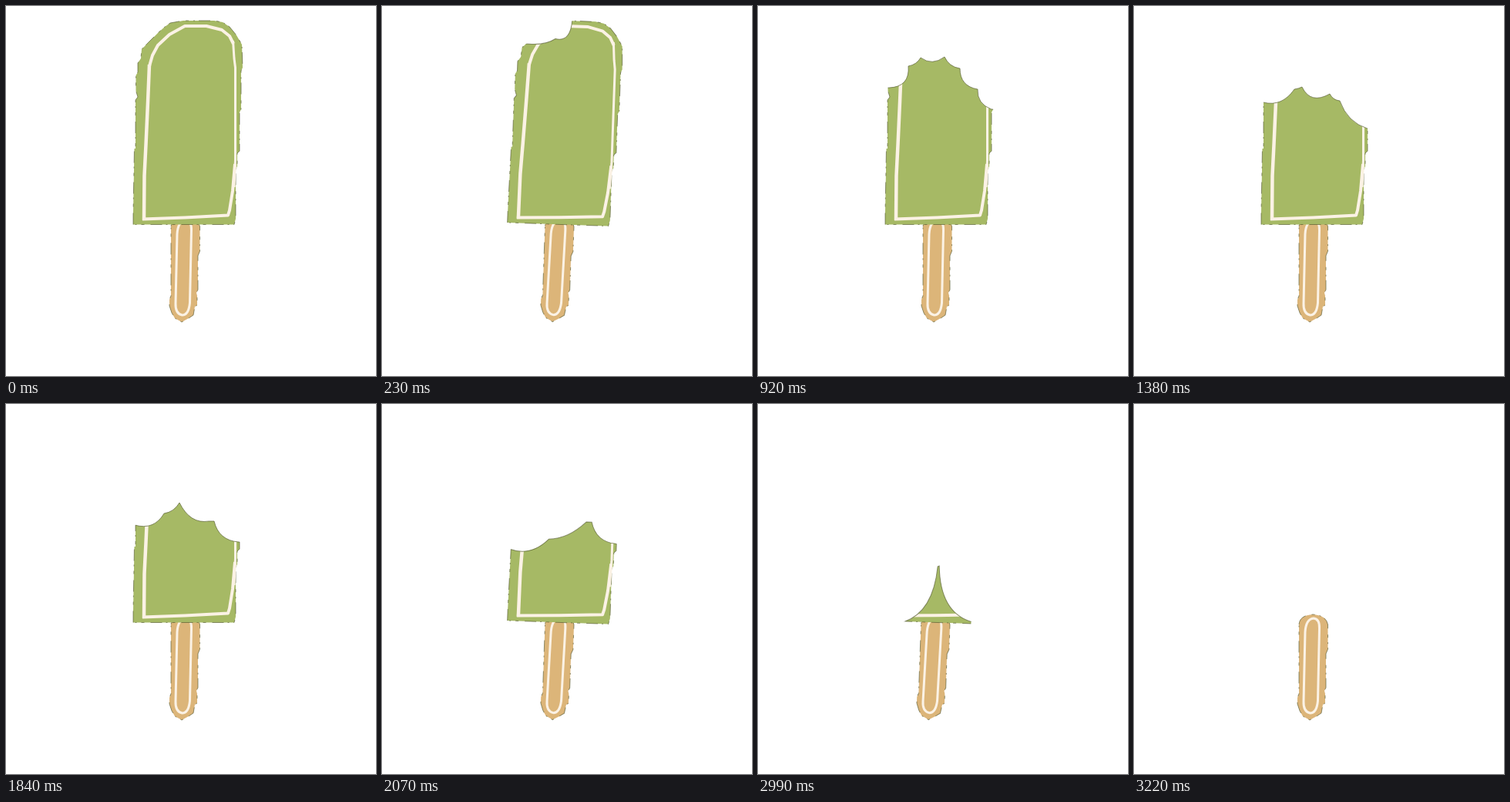
An HTML page for the animation above (3.45 s loop, 480 by 480 pixels).

```html
<!DOCTYPE html>
<html lang="en">
<head>
<meta charset="utf-8">
<title>Ice pop</title>
<style>
  html, body { margin: 0; width: 100%; height: 100%; overflow: hidden; background: #fff; }
  svg { display: block; width: 100%; height: 100%; }
  .line { fill: none; stroke: #fbf2e5; stroke-linejoin: round; }
  .edge { fill: none; stroke: #4b5128; stroke-opacity: .6; }
  .rough { stroke-dasharray: 15 8 4 6 2 5; }
</style>
</head>
<body>
<svg viewBox="0 0 480 480">
  <defs>
    <path id="body" d="M165 283.500V268L166.500 185H168V122L171 118L168.500 110V90L171 86V74L175 68L176 56L182 50L190 42L197 35L206 27L213 22L230 19H270L281 21L290 27L299 38L306 50L307 80L305 84V134L303 138V188L300 191V208L298 212V276L296 283.500Z"/>
    <path id="stick" d="M214 286Q215 274 232 273Q249 274 251.500 286V318L249 324V368L247 372L248 376V388L245 390L243 401L237 405L228 410L219 405L215 398L212 389V381L214 376Z"/>
    <clipPath id="left-over"><path id="remains"/></clipPath>
    <clipPath id="inside"><use href="#body"/></clipPath>
  </defs>
  <g id="pop">
    <use href="#stick" fill="#dcb579"/>
    <use href="#stick" class="edge rough"/>
    <path class="line" stroke-width="3" d="M222 296Q223 279 233 278Q241 279 240.500 291L238.500 385Q237 401 228.500 401Q219.500 399 220 386Z"/>
    <g clip-path="url(#left-over)">
      <use href="#body" fill="#a6b965"/>
      <use href="#body" class="edge rough"/>
      <path class="line" stroke-width="4.500" d="M179 278L179.500 220L181.500 180L184 125L186 76"/>
      <path class="line" stroke-width="4" d="M186 78L190 64L197 51L212 37L232 26H260L280 31L290 39L295 49"/>
      <path class="line" stroke-width="3" d="M294.500 45L296 68L297.500 80V200L296 235"/>
      <path class="line" stroke-width="4" d="M297 205L294 240L290 265L288 271.500L232 274.500L177 276.500"/>
    </g>
    <g clip-path="url(#inside)"><path id="cut" class="edge"/></g>
  </g>
</svg>
<script>
  const STEP = 230;
  const TILT = [0, 2, 0, -2];

  // Bite edges, left to right; the ice below each edge remains.
  const bites = [
    'M150 0H320',
    'M150 51H185Q206 52 219 43Q241 48 240 10H320',
    'M150 51H185Q206 52 219 43Q238 62 258 48Q272 69 288 56Q295 69 306 67H320',
    'M150 106H170Q197 105 195 78Q206 76 211 67Q226 78 242 66Q254 64 258 48Q272 69 288 56Q295 69 306 67H320',
    'M150 106H170Q197 105 195 78Q206 76 211 67Q226 78 242 66Q248 79 262 81Q262 104 285 108Q284 127 303 134H320',
    'M150 125H168Q192 131 208 108Q214 107 218 105Q238 134 263 89Q267 105 285 108Q284 127 303 134H320',
    'M150 125H168Q192 131 208 108Q214 107 218 105Q229 128 254 114Q258 122 267 123Q277 151 303 159H320',
    'M150 157H167Q192 164 205 142Q218 140 225 128Q246 140 254 114Q258 122 267 123Q277 151 303 159H320',
    'M150 157H167Q192 164 205 142Q218 140 225 128Q239 156 263 152H270Q276 177 302 179H320',
    'M150 191H166Q193 199 215 176Q240 175 263 152H270Q276 177 302 179H320',
    'M150 191H166Q182 197 196 187Q208 212 235 210Q265 232 299 211H320',
    'M150 211H166Q200 228 235 210Q265 232 299 211H320',
    'M150 211H166Q200 228 235 210Q238 270 279 281',
    'M192 284Q229 270 233 211L235 210Q238 270 279 281',
    'M150 300H320'
  ];

  const [pop, remains, cut] = ['pop', 'remains', 'cut'].map(id => document.getElementById(id));
  let shown = -1;

  function draw(now) {
    const step = Math.floor(now / STEP) % bites.length;
    if (step !== shown) {
      shown = step;
      remains.setAttribute('d', bites[step] + 'V300H150Z');
      cut.setAttribute('d', bites[step]);
      pop.setAttribute('transform', `rotate(${TILT[step % 4]} 236 215)`);
    }
  }

  const start = performance.now();
  function tick() {
    draw(performance.now() - start);
    requestAnimationFrame(tick);
  }
  tick();
</script>
</body>
</html>
```
